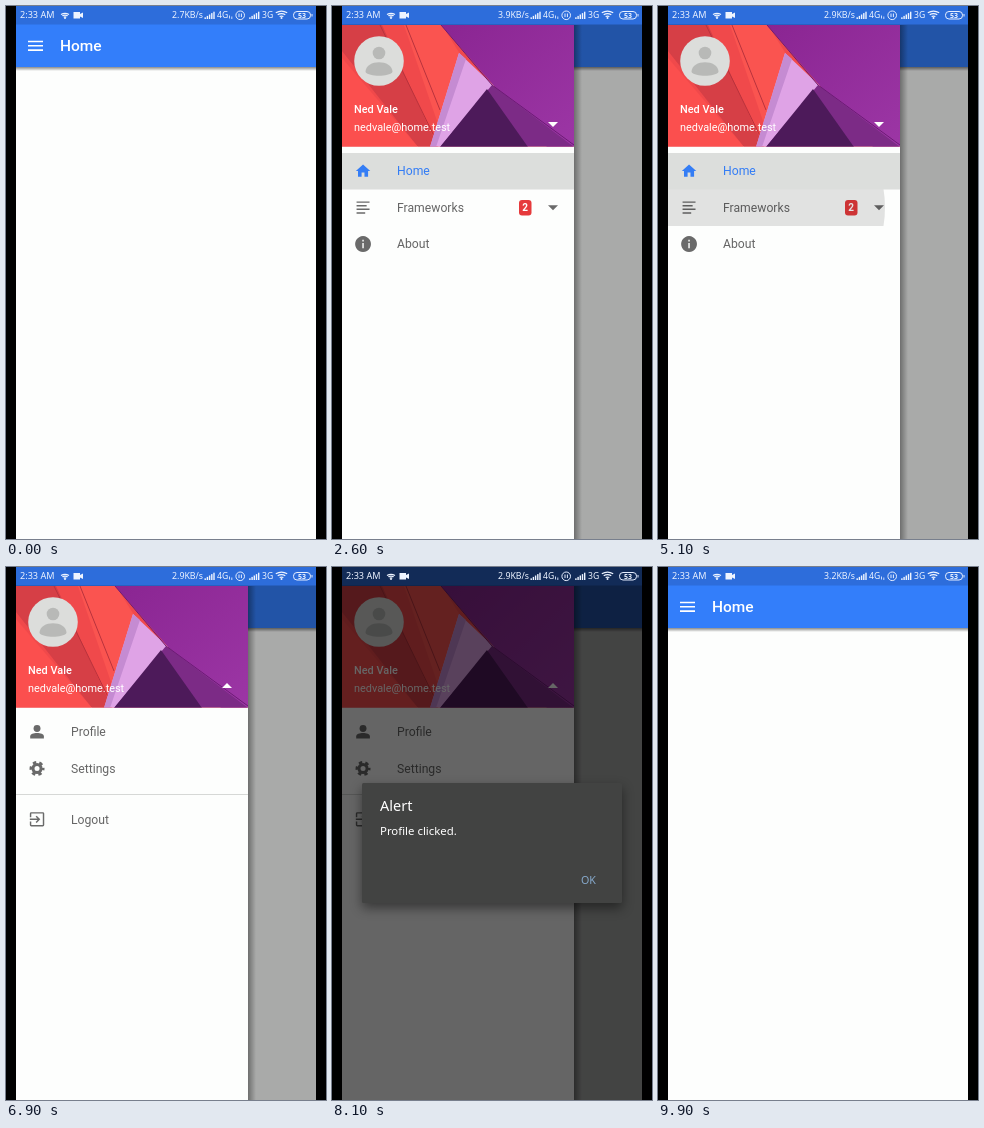
An HTML page that plays this animation: 320x533 px, repeating every 10000 ms.

```html
<!DOCTYPE html>
<html lang="en">
<head>
<meta charset="utf-8">
<title>Navigation drawer</title>
<style>
  html, body { margin: 0; width: 100%; height: 100%; overflow: hidden; background: #000; }
  body > svg { display: block; width: 100%; height: 100%; }
  text { font: 12.2px Roboto, sans-serif; fill: #666; }
  .white { fill: #fff; }
  .status, .status text { font: 9.1px "Noto Sans", "Open Sans", sans-serif; fill: #eef4ff; }
  .dialog text { font-family: "Noto Sans", "Open Sans", sans-serif; fill: #fff; }
  .icon { fill: #6a6a6a; }
  .active, .active .icon, .active text { fill: #347df5; }
</style>
</head>
<body>
<svg viewBox="0 0 320 533">
  <defs>
    <linearGradient id="down" x2="0" y2="1">
      <stop stop-opacity=".45"/><stop offset="1" stop-opacity="0"/>
    </linearGradient>
    <linearGradient id="side">
      <stop stop-opacity=".35"/><stop offset="1" stop-opacity="0"/>
    </linearGradient>
    <linearGradient id="violet" x2="1" y2="1">
      <stop stop-color="#8a2592"/><stop offset="1" stop-color="#9c36a5"/>
    </linearGradient>
  </defs>

  <svg x="10" width="300" height="533" viewBox="10 0 300 533">
    <!-- page -->
    <rect x="10" width="300" height="533" fill="#fdfefd"/>
    <rect x="10" y="61" width="300" height="4" fill="url(#down)"/>
    <rect x="10" y="18" width="300" height="43" fill="#337efa"/>
    <path d="M22 35.5h15M22 39.8h15M22 44.1h15" stroke="#fff" stroke-width="1.6"/>
    <text class="white" x="54" y="45" style="font-size:15.5px;font-weight:500">Home</text>
    <rect id="scrim" x="10" y="18" width="300" height="515"/>

    <g id="drawer">
      <rect x="242" y="19" width="8" height="514" fill="url(#side)"/>
      <rect x="10" y="19" width="232" height="514" fill="#fdfefd"/>

      <!-- account header -->
      <svg x="10" y="19" width="232" height="121.5" viewBox="10 19 232 121.5">
        <rect x="10" y="19" width="232" height="122" fill="#f0494b"/>
        <path d="M10 19H50L106 141H86L10 45z" fill="#d63f46"/>
        <path d="M10 52L86 141H10z" fill="#fb4f4e"/>
        <path d="M72 19H110L128 48L106 118z" fill="#fa5450"/>
        <path d="M48 19L104 134M74 19L108 104" stroke="#b9323c" fill="none"/>
        <path d="M109 19H242V141H215z" fill="url(#violet)"/>
        <path d="M127 47L162 80L112 141H98z" fill="#dfa3e6"/>
        <path d="M127 47L134 53L104 141H98z" fill="#c58bd2"/>
        <path d="M160 79L242 141H108z" fill="#7c2b86"/>
        <path d="M155 83L196 141H108z" fill="#4d1a5a"/>
        <path d="M109 19L160 79L242 139" stroke="#6c1c75" fill="none"/>
      </svg>
      <circle cx="47" cy="55" r="24.8" fill="#dcdddb"/>
      <circle cx="47" cy="47" r="6.3" fill="#b8b9b7"/>
      <path d="M33.5 66C33.500 53 60.500 53 60.500 66C57 71 37 71 33.500 66z" fill="#b8b9b7"/>
      <text class="white" x="22" y="107" style="font-size:10.9px;font-weight:500">Ned Vale</text>
      <text class="white" x="22" y="125.300" style="font-size:10.9px">nedvale@home.test</text>
      <path id="accountArrow" class="white" d="M216 116h10l-5 5z"/>

      <g id="mainMenu">
        <rect x="10" y="147" width="232" height="36.5" fill="#dcdedc"/>
        <g id="mainRows"></g>
        <rect x="187" y="194" width="12.500" height="15.500" rx="3" fill="#e63a3c"/>
        <text class="white" x="193.200" y="205.300" text-anchor="middle" style="font-size:10px;font-weight:700">2</text>
        <path id="subArrow" class="icon" d="M216 199.200h10l-5 5z"/>
        <svg id="sub" x="10" y="220" width="232">
          <text x="55" y="22.500">Frontend</text>
          <text x="55" y="59">Backend</text>
        </svg>
        <g id="about"></g>
        <svg x="10" y="183.500" width="232" height="36.500"><circle id="frameRipple" cx="100" cy="18"/></svg>
      </g>

      <g id="accountMenu">
        <g id="accountRows"></g>
        <path d="M10 227.500H242" stroke="#d6d8d6"/>
        <svg x="10" y="147" width="232" height="36.500"><circle id="profileRipple" cx="70" cy="18"/></svg>
      </g>
    </g>

    <rect x="10" width="300" height="18.500" fill="#2d6ddb"/>
    <rect id="dim" x="10" width="300" height="533"/>

    <g id="dialog" class="dialog">
      <rect x="30" y="216" width="260" height="120" rx="1.500" fill="#424342"
            style="filter:drop-shadow(0 5px 6px rgba(0,0,0,.45))"/>
      <text x="48" y="244" style="font-size:14.500px">Alert</text>
      <text x="48" y="268.300" style="font-size:11.400px">Profile clicked.</text>
      <text x="249" y="317.300" style="font-size:10.700px;fill:#86a9cc">OK</text>
    </g>

    <!-- status bar content -->
    <g class="status">
      <text x="14" y="12">2:33 AM</text>
      <path d="M67.500 6h6.500v2l3-1.500v5.500l-3-1.500v2h-6.500z"/>
      <text id="speed" x="166" y="12" style="font-size:8.800px"></text>
      <text x="211" y="11.700" style="font-size:8.600px">4G</text>
      <text x="256" y="11.700" style="font-size:8.600px">3G</text>
      <path d="M223.500 9.500v3M225.800 10.500v2.500" stroke="#dce8ff" stroke-width=".9"/>
      <g fill="none" stroke="#e6eeff" stroke-width="1">
        <circle cx="234.200" cy="9.300" r="4.300"/>
        <path d="M233 7.500v3.600M235.400 7.500v3.600"/>
        <rect x="287.500" y="5.500" width="17" height="7.500" rx="3.500"/>
        <path d="M306 8v2.500"/>
      </g>
      <text x="296" y="12" text-anchor="middle" style="font-size:7px;font-weight:600">53</text>
      <g id="signals"></g>
    </g>
  </svg>
</svg>

<script>
const $ = id => document.getElementById(id);
const set = (id, attrs) => {
  for (const name in attrs) $(id).setAttribute(name, attrs[name]);
};

const icons = {
  home: '<path d="M10 20v-6h4v6h5v-8h3L12 3 2 12h3v8z"/>',
  list: '<path d="M3 3.500h18v2H3zM3 8.500h14v2H3zM3 13.500h18v2H3zM3 18.500h12v2H3z"/>',
  info: '<path fill-rule="evenodd" d="M12 1a11 11 0 1 0 .01 0zM11 6h2v2.500h-2zM11 10.500h2V18h-2z"/>',
  person: '<circle cx="12" cy="7" r="4.800"/><path d="M2.500 21v-3c0-6 19-6 19 0v3z"/>',
  gear: `<g fill="none" stroke="#6a6a6a"><circle cx="12" cy="12" r="5.600" stroke-width="4.200"/>
    <circle cx="12" cy="12" r="8.600" stroke-width="3.600" stroke-dasharray="4.600 4.405" stroke-dashoffset="2.300"/></g>`,
  exit: '<path d="M10 15.600L11.500 17l5-5-5-5L10 8.400 12.700 11H2v2h10.700zM2 9V4q0-2 2-2h16q2 0 2 2v16q0 2-2 2H4q-2 0-2-2v-5h2v5h16V4H4v5z"/>'
};

const row = (label, icon, y, cls = '') =>
  `<g class="${cls}"><g class="icon" transform="translate(22.400 ${y - 8.600}) scale(.72)">${icons[icon]}</g>
   <text x="65" y="${y + 4.300}">${label}</text></g>`;

$('mainRows').innerHTML = row('Home', 'home', 165, 'active') + row('Frameworks', 'list', 201.5);
$('about').innerHTML = row('About', 'info', 238);
$('accountRows').innerHTML =
  row('Profile', 'person', 165) + row('Settings', 'gear', 201.5) + row('Logout', 'exit', 252.3);

const bars = x => [0, 1, 2, 3, 4].map(i =>
  `<rect x="${x + i * 2.2}" y="${11.3 - i * 1.4}" width="1.400" height="${1.7 + i * 1.4}"/>`).join('');
const wifi = (x, size) => [1, 2, 3].map(i => {
  const r = size * i / 3;
  return `<path fill="none" stroke="#eef4ff" stroke-width="1.200"
    d="M${x - r} ${12.5 - r}q${r} ${-r * .6} ${2 * r} 0"/>`;
}).join('') + `<circle cx="${x}" cy="12" r="1"/>`;
$('signals').innerHTML = bars(198.5) + bars(243.2) + wifi(59, 4) + wifi(275.5, 5.7);

// Progress of t from a to b, limited to 0..1
const ramp = (t, a, b) => Math.min(1, Math.max(0, (t - a) / (b - a)));
const easeOut = p => 1 - (1 - p) ** 3;
const easeInOut = p => p * p * (3 - 2 * p);
const between = (t, a, b) => ramp(t, a, a + 300) - ramp(t, b, b + 300);

function ripple(id, t, start) {
  const age = t - start;
  set(id, {
    r: age < 0 ? 0 : Math.min(240, 27 + age * .3),
    opacity: age < 0 ? 0 : .11 * (1 - ramp(age, 350, 700))
  });
}

const speeds = [[8800, '3.2'], [4800, '2.9'], [1000, '3.9'], [0, '2.7']];

function draw(t) {
  const scrim = ramp(t, 1300, 1560) - ramp(t, 8700, 9000);
  const shown = easeOut(ramp(t, 1500, 1900)) - easeInOut(ramp(t, 8650, 9000));
  set('scrim', { opacity: .335 * scrim });
  set('drawer', { transform: `translate(${-242 * (1 - shown)})`, opacity: shown > 0 ? 1 : 0 });

  const open = easeInOut(ramp(t, 2850, 3150)) - easeInOut(ramp(t, 4750, 5050));
  set('sub', { height: 73 * open });
  set('about', { transform: `translate(0 ${73 * open})` });
  set('subArrow', { transform: `rotate(${180 * open} 221 201.700)` });
  ripple('frameRipple', t, t < 4000 ? 2800 : 4800);

  const account = t >= 6300;
  set('mainMenu', { display: account ? 'none' : 'inline' });
  set('accountMenu', { display: account ? 'inline' : 'none' });
  set('accountArrow', { transform: `rotate(${180 * ramp(t, 6250, 6450)} 221 118.500)` });
  ripple('profileRipple', t, 7200);

  const alert = easeOut(ramp(t, 7500, 7750)) - ramp(t, 8350, 8550);
  const scale = .9 + .1 * alert;
  set('dim', { opacity: .6 * alert });
  set('dialog', {
    opacity: alert,
    transform: `translate(160 276) scale(${scale}) translate(-160 -276)`
  });

  $('speed').textContent = speeds.find(([start]) => t >= start)[1] + 'KB/s';
}

const begin = performance.now();
function tick() {
  const t = (performance.now() - begin) % 10000;
  draw(Math.floor(t / 100) * 100);
  requestAnimationFrame(tick);
}
tick();
</script>
</body>
</html>
```
